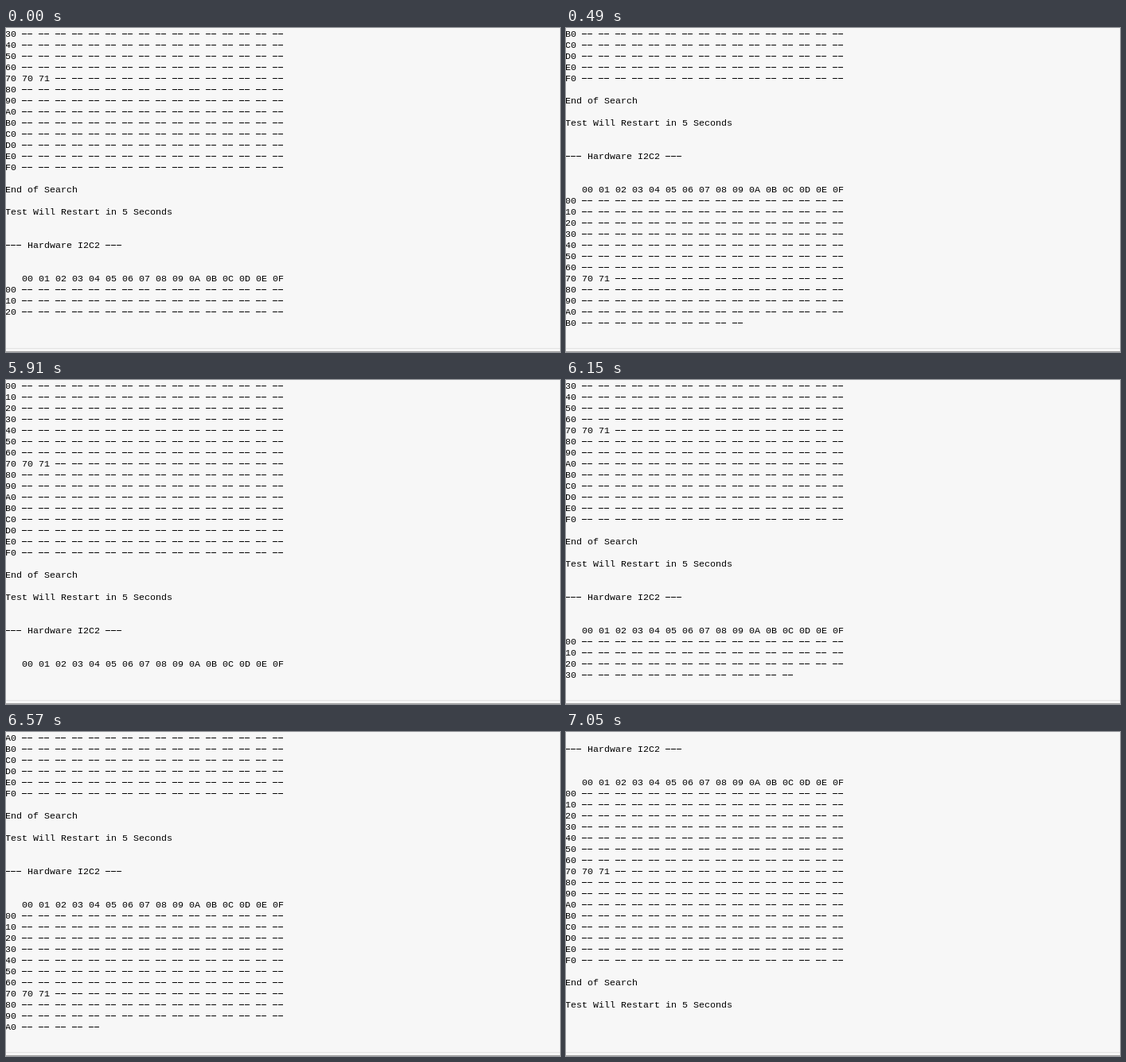
These frames come from a looping animation (696 px wide and 408 px high, 8000 ms). An HTML page with a canvas:

```html
<!DOCTYPE html>
<html lang="en">
<head>
<meta charset="utf-8">
<title>Bus scan terminal</title>
<style>
  html, body { margin: 0; width: 100%; height: 100%; overflow: hidden; background: #f7f7f7; }
  canvas { display: block; }
</style>
</head>
<body>
<canvas id="stage" width="696" height="408"></canvas>
<script>
const ctx = document.getElementById('stage').getContext('2d');
const LOOP = 8000, TICK = 60;
const CHAR_W = 7, LINE_H = 14, LEFT = -1, VISIBLE_LINES = 27;

// One complete scan report, as printed over the serial line.
const hex = n => n.toString(16).toUpperCase().padStart(2, '0');
const columns = [...Array(16).keys()];
const found = [0x70, 0x71];
const scanRow = r => [hex(r * 16), ...columns.map(c => {
  const address = r * 16 + c;
  return found.includes(address) ? hex(address) : '--';
})].join(' ');

const report = [
  '--- Hardware I2C2 ---', '', '',
  '   ' + columns.map(hex).join(' '),
  ...columns.map(scanRow),
  '', 'End of Search', '', 'Test Will Restart in 5 Seconds', '', ''
];
const reportText = report.join('\n');

// Number of characters printed when the cursor stands at a line and column.
const cursorAt = (line, col) =>
  report.slice(0, line).reduce((sum, text) => sum + text.length + 1, 0) + col;

const done = cursorAt(25, 0);
const keys = [
  [0, cursorAt(7, 0)],
  [490, cursorAt(15, 32)],
  [850, done],
  [5910, cursorAt(4, 0)],
  [6390, cursorAt(11, 32)],
  [6810, cursorAt(17, 50)],
  [7050, done],
  [LOOP, 0]
];

// Printing advances in ticks; a finished report holds until the next one starts.
function printedCount(time) {
  const i = keys.findLastIndex(([start]) => start <= time);
  const [start, from] = keys[i];
  const [end, to] = keys[i + 1];
  if (to < from) return from;
  const steps = Math.round((end - start) / TICK);
  const step = Math.min(Math.floor((time - start) / TICK), steps - 1);
  return Math.round(from + (to - from) * step / steps);
}

function drawLine(text, row) {
  const top = row * LINE_H;
  [...text].forEach((char, i) => {
    const x = LEFT + i * CHAR_W;
    if (char === '-') ctx.fillRect(x, top + 7, 6, 1);
    else if (char !== ' ') ctx.fillText(char, x, top + 11);
  });
}

function draw(time) {
  ctx.fillStyle = '#f7f7f7';
  ctx.fillRect(0, 0, 696, 408);
  ctx.fillStyle = '#e3e3e3';
  ctx.fillRect(0, 403, 696, 1);
  ctx.fillStyle = '#a0a0a0';
  ctx.fillRect(0, 407, 696, 1);

  ctx.fillStyle = '#000';
  ctx.font = '11.667px "Liberation Mono", "Courier New", monospace';
  const log = reportText + '\n' + reportText.slice(0, printedCount(time));
  log.split('\n').slice(-VISIBLE_LINES).forEach(drawLine);
}

const origin = performance.now();
function frame() {
  draw((performance.now() - origin) % LOOP);
  requestAnimationFrame(frame);
}
frame();
</script>
</body>
</html>
```
